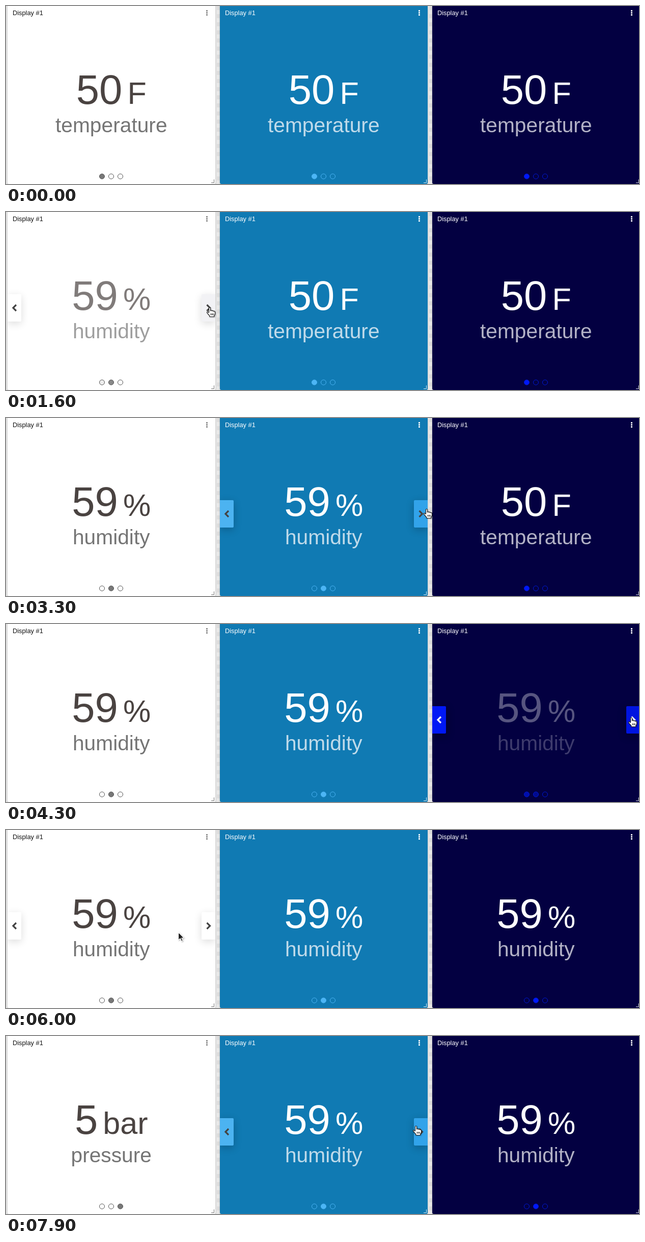
Write an HTML page that moves like this. It is 1243 by 351 pixels and loops after 8000 ms.

```html
<!DOCTYPE html>
<html lang="en">
<head>
<meta charset="utf-8">
<title>Display cards</title>
<style>
html, body { margin: 0; width: 100%; height: 100%; overflow: hidden; }
body { position: relative; background: #e8e8e8; font-family: "Liberation Sans", Arial, sans-serif; }
.gap {
  position: absolute; top: 0; width: 6px; height: 351px;
  background: repeating-linear-gradient(#dedede 0 8px, #eaeaea 8px 16px);
}
.card {
  position: absolute; top: -3px; width: 407.5px; height: 354px; overflow: hidden;
  border-radius: 3px; background: var(--bg); box-shadow: 0 1px 4px rgba(0, 0, 0, .18);
}
.card svg { position: absolute; left: 0; top: 3px; }
.title { font-size: 12.8px; fill: var(--title); }
.value { font-size: 81.5px; fill: var(--value); }
.unit { font-size: 61.1px; }
.label { font-size: 40.75px; fill: var(--label); }
.menu { fill: var(--menu); }
.corner { fill: none; stroke: var(--corner); }
.dot { fill: var(--dot); stroke: var(--ring); stroke-width: 1; }
.nav {
  position: absolute; top: 165px; width: 27px; height: 54px; background: var(--button);
  box-shadow: 0 4px 16px rgba(0, 0, 0, var(--shade));
}
.nav.hover { background: var(--hover); }
.nav.prev { left: 0; border-radius: 0 2px 2px 0; }
.nav.next { right: 0; border-radius: 2px 0 0 2px; }
.nav svg { top: 0; }
.nav path { fill: none; stroke: var(--icon); stroke-width: 3.2; }
#cursor { position: absolute; left: 0; top: 0; overflow: visible; filter: drop-shadow(1px 1px 1px rgba(0, 0, 0, .3)); }
#cursor path { stroke-width: 1.2; stroke-linejoin: round; }
</style>
</head>
<body>
<div class="gap" style="left:414px"></div>
<div class="gap" style="left:831px"></div>
<svg id="cursor" width="22" height="22">
  <path id="arrow" fill="#1c1c1c" stroke="#fff" d="M.5 .5V16.3L4.2 13 6.8 18.6 9.3 17.5 6.8 12H11.6Z"/>
  <path id="hand" fill="#fff" stroke="#222" d="M-1.5 10V2Q-1.5 .5 0 .5T1.5 2V7Q1.6 5.6 3 5.8T4.5 7.2Q5 6.2 6.2 6.6T7.5 8Q8.2 7.2 9.2 7.6T10.5 9V13Q10 15 8.8 16V18.5H-.2V16.5Q-3 13.8-5.2 10.6-5.8 9-4.3 8.6-3 8.8-1.5 10.8M2.4 12V15.5M4.8 12V15.5M7 12V15.5"/>
</svg>
<script>
const LOOP = 8000, STEP = 100, WIDTH = 407.5;
const PAGES = [["50", "F", "temperature"], ["59", "%", "humidity"], ["5", "bar", "pressure"]];

const THEMES = [
  { left: 3, clicks: [[1300, 430], [6500, 430]], colors: {
    bg: "#fff", title: "#111", value: "#4a4341", label: "#757575", menu: "#888", corner: "#777",
    dot: "#787878", ring: "#4f4f4f", button: "#fff", hover: "#f2f2f5", icon: "#444", shade: .14 } },
  { left: 420, clicks: [[2800, 400]], colors: {
    bg: "#107ab3", title: "#fff", value: "#fff", label: "#bfdaea", menu: "#fff", corner: "#d5e8f2",
    dot: "#4cb5f5", ring: "#4cb5f5", button: "#4cb3f1", hover: "#32a3ea", icon: "#444", shade: .22 } },
  { left: 837, clicks: [[4200, 300]], colors: {
    bg: "#030041", title: "#fff", value: "#fff", label: "#b3b2c6", menu: "#fff", corner: "#d0d0dc",
    dot: "#0018f9", ring: "#0018d8", button: "#0018f5", hover: "#0014e0", icon: "#fff", shade: .4 } }
];

// Pointer tip: time, x, y
const PATH = [
  [300, 107, 55], [600, 215, 110], [900, 345, 168], [1100, 397, 187], [1200, 400, 188], [1700, 400, 188],
  [2000, 463, 190], [2100, 463, 190], [2400, 709, 175], [2700, 826, 179], [3300, 826, 179],
  [3500, 961, 188], [3600, 961, 188], [4000, 1228, 184], [4700, 1228, 184], [5000, 1160, 260],
  [5300, 720, 268], [5600, 300, 247], [6000, 338, 201], [6500, 391, 188], [7000, 391, 188],
  [7400, 683, 186], [7500, 683, 186], [7900, 805, 177], [8000, 805, 177]
];

const navButton = (side, d) =>
  `<div class="nav ${side}"><svg width="27" height="54"><path d="${d}"/></svg></div>`;

function buildCard({ left, clicks, colors }) {
  const root = document.createElement("div");
  root.className = "card";
  root.style.left = left + "px";
  for (const name in colors) root.style.setProperty("--" + name, colors[name]);
  root.innerHTML = `<svg width="${WIDTH}" height="351">
    <text class="title" x="10" y="18">Display #1</text>
    ${[8, 12, 16].map(y => `<rect class="menu" x="390" y="${y}" width="3" height="3" rx=".8"/>`).join("")}
    <g class="reading" text-anchor="middle">
      <text class="value" x="203.75" y="193"><tspan class="number"></tspan><tspan class="unit" dx="10"></tspan></text>
      <text class="label" x="203.75" y="249"></text>
    </g>
    ${[185.5, 203.5, 221.5].map(x => `<circle class="dot" cx="${x}" cy="336" r="5"/>`).join("")}
    <path class="corner" d="M405.5 342V348.5H400"/>
  </svg>` + navButton("prev", "M17 21 11 27 17 33") + navButton("next", "M10.5 21 16.5 27 10.5 33");
  document.body.insertBefore(root, cursor);
  const find = name => root.querySelector("." + name);
  return {
    left, clicks, reading: find("reading"), number: find("number"), unit: find("unit"),
    label: find("label"), dots: root.querySelectorAll(".dot"), prev: find("prev"), next: find("next")
  };
}

const cursor = document.getElementById("cursor");
const arrow = document.getElementById("arrow");
const hand = document.getElementById("hand");
const cards = THEMES.map(buildCard);
const show = (node, on) => { node.style.display = on ? "" : "none"; };

function pointerAt(t) {
  const i = PATH.findIndex(p => p[0] > t);
  if (i < 1) return null;
  const [t0, x0, y0] = PATH[i - 1], [t1, x1, y1] = PATH[i];
  const k = (t - t0) / (t1 - t0);
  return { x: x0 + (x1 - x0) * k, y: y0 + (y1 - y0) * k };
}

function updateCard(card, t, pointer) {
  const past = card.clicks.filter(([start]) => t > start);
  const page = past.length;
  const fade = page ? Math.min(1, (t - past[page - 1][0]) / past[page - 1][1]) : 1;
  [card.number.textContent, card.unit.textContent, card.label.textContent] = PAGES[page];
  card.reading.style.opacity = fade;

  const dotFade = Math.min(1, fade * 1.25);
  card.dots.forEach((dot, i) => {
    dot.style.fillOpacity = i === page ? dotFade : i === page - 1 ? 1 - dotFade : 0;
  });

  const x = pointer ? pointer.x - card.left : -1;
  const inside = x >= 0 && x < WIDTH;
  const level = inside && pointer.y > 162 && pointer.y < 216;
  const onPrev = level && page > 0 && x < 27;
  const onNext = level && page < 2 && x > WIDTH - 27;
  show(card.prev, inside && page > 0);
  show(card.next, inside && page < 2);
  card.prev.classList.toggle("hover", onPrev);
  card.next.classList.toggle("hover", onNext);
  return onPrev || onNext;
}

function draw(now) {
  const t = Math.floor((now % LOOP) / STEP) * STEP;
  const pointer = pointerAt(t);
  const pressing = cards.map(card => updateCard(card, t, pointer)).some(Boolean);
  show(cursor, pointer);
  if (pointer) cursor.style.transform = `translate(${Math.round(pointer.x)}px, ${Math.round(pointer.y)}px)`;
  show(arrow, !pressing);
  show(hand, pressing);
}

let origin;
function tick(now) {
  origin ??= now;
  draw(now - origin);
  requestAnimationFrame(tick);
}
draw(0);
requestAnimationFrame(tick);
</script>
</body>
</html>
```
